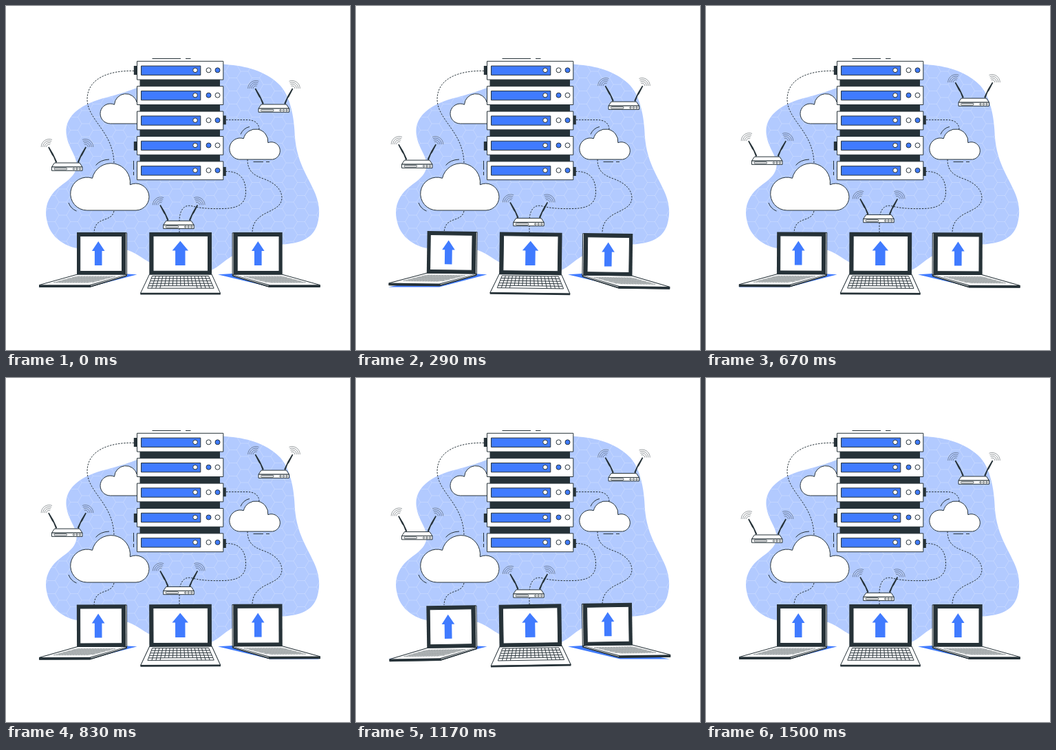
Animation of 500 by 500 pixels, one loop 1540 ms. Source, as an HTML page:

```html
<!DOCTYPE html>
<html lang="en">
<head>
<meta charset="utf-8">
<title>Cloud upload</title>
<style>
  html, body { margin: 0; width: 100%; height: 100%; overflow: hidden; background: #fff; }
  svg { display: block; width: 100vw; height: 100vh; }
  .ink { fill: none; stroke: #263238; stroke-width: 1; stroke-linejoin: round; }
  .box { fill: #fff; stroke: #263238; stroke-width: 1; stroke-linejoin: round; }
  .blue { fill: #407bff; }
  .dark { fill: #263238; }
  .wire { stroke-dasharray: 2.4 1.7; }
  .wave { stroke-width: .6; opacity: .8; }
  .thin { stroke-width: .8; }
  .key { stroke-width: .95; }
  .hatch { stroke-width: .5; opacity: .6; }
  .shine { fill: none; stroke: #fff; stroke-width: .8; }
</style>
</head>
<body>
<svg viewBox="0 0 500 500">
  <defs>
    <pattern id="hex" width="33" height="19" patternUnits="userSpaceOnUse">
      <path d="M0 9.5H5.5L11 0H22L27.5 9.5H33M5.5 9.5L11 19H22L27.5 9.5" fill="none" stroke="#fff" stroke-width=".6" opacity=".36"/>
    </pattern>
    <path id="blob" d="M87.500 184C86 158 112 141 146 133C180 124 196 117 225 104C256 90 290 81 325 85.500C354 88 381 97 399 116C413 132 419 160 420 191C423 226 437 245 447 267C455 284 458 300 452 319C445 339 426 345 402 346.500C368 348 350 354 328 364C314 372 306 384 286 388C256 392 228 384 206 371C192 363 184 355 168 353C146 350 125 356 104 352.500C83 348 67 336 61 318C55 299 58 284 70 270C82 257 98 252 102 236C106 219 89 207 87.500 184Z"/>
  </defs>

  <use href="#blob" fill="#b2caff"/>
  <use href="#blob" fill="url(#hex)"/>

  <g class="ink wire">
    <path d="M186 94.300C150 93.500 118 105 118 136C119 167 156 182 157 229"/>
    <path d="M320 165.500H350C361 165.500 368 170 368 180"/>
    <path d="M351 223C351 240 360 246 374 251C391 257 401 267 401 279C400 303 358 295 358 330"/>
    <path d="M157 298C153 316 129 304 128 330"/>
    <path d="M319 240.500C339 240 348 250 348.500 269C349 288 337 294 316 294.500C296 295 282 294 269 290.500C256 288 252 302 252 312V329"/>
  </g>

  <path class="box" d="M200 171H151.500A14.500 14.500 0 1 1 157.500 143.300A16.700 16.700 0 0 1 190.300 140Q194 140 200 145Z"/>
  <path class="box" d="M117.800 297A24 24 0 1 1 125.500 250.300A27.850 27.850 0 0 1 180.300 259.800A19.500 19.500 0 1 1 189 297Z"/>
  <path class="box" d="M338.500 223A15.600 15.600 0 1 1 345.300 192.700A18.050 18.050 0 0 1 380.800 198.700A12.700 12.700 0 1 1 387.500 223Z"/>

  <path class="ink" d="M130.500 231.500Q137 223.500 150 223M91 286Q94 294.500 102.500 298M341 186.500Q345 177.500 354 175.500M359.500 226.500H374M378 226.500H383M185.500 225V238M185.500 241V246M212.500 76.500H254M261 76.500H268.500"/>

  <g id="server"></g>
  <path class="blue" d="M47 408.500H121L190.500 390.300L150 388ZM308 390.300L345 388L456 408.500H384Z"/>
  <g id="laptops"></g>
  <g id="routers"></g>
</svg>
<script>
const byId = id => document.getElementById(id);
const rect = (x, y, w, h, cls, fill = '') =>
  `<rect x="${x}" y="${y}" width="${w}" height="${h}" class="${cls}" style="fill:${fill}"/>`;
const path = (d, cls) => `<path d="${d}" class="${cls}"/>`;
const dot = (x, y, r, cls, fill = '#fff') =>
  `<circle cx="${x}" cy="${y}" r="${r}" class="${cls}" style="fill:${fill}"/>`;
const BLUE = '#407bff';

function server() {
  let s = rect(194.5, 100, 116.5, 132, 'dark');
  for (const [x, y] of [[185.8, 87], [185.8, 197], [315, 159.3], [315, 234]]) s += rect(x, y, 4.8, 13, 'dark');
  for (let i = 0; i < 5; i++) {
    const y = 80.3 + i * 36.4;
    const lit = i % 2 ? 294.5 : 307.5;
    s += rect(190.5, y, 125.3, 26.8, 'box') + rect(196.5, y + 6.8, 86.3, 13.3, 'box', BLUE);
    s += dot(275, y + 13, 3.3, 'box');
    for (const x of [294.5, 307.5]) s += dot(x, y + 13, 3.5, 'box', x === lit ? BLUE : '#fff');
  }
  return s;
}

// Upward arrow: tip, half widths of head and shaft
const arrow = (x, y, head, shaft) => path(
  `M${x} ${y}L${x + head} ${y + 14}H${x + shaft}V377H${x - shaft}V${y + 14}H${x - head}Z`, 'blue');

function sideLaptop() {
  let s = path('M104 390H175.500L175 392.500L122 408.500H48.500V405.500Z', 'box');
  s += path('M48 405.300H121.500L175.500 390V392.500L122 408.800H48Z', 'dark');
  s += path('M123 406.500L174 391.300', 'shine');
  // keyboard rows and slanted columns
  let d = '';
  for (let i = 0; i < 6; i++) d += `M${103 - i * 6.8} ${393 + i * 1.8}h${56 - i * .8}`;
  for (let i = 0; i < 15; i++) d += `M${103 + i * 4} 393l-34 9`;
  s += path(d, 'ink hatch');
  s += rect(173, 329.8, 2.6, 60.5, 'box');
  s += rect(103, 329, 71.3, 61.5, 'dark');
  return s + rect(107.7, 334.5, 60.8, 51, 'box');
}

function midLaptop() {
  let s = path('M208.500 390H299L311.500 417.500H195.500Z', 'box');
  s += rect(195.3, 416.8, 116.5, 2.7, 'dark');
  // keys narrow towards the screen
  const left = y => 212.5 - (y - 392.5) * .38;
  const right = y => 294.5 + (y - 392.5) * .43;
  const at = (u, y) => left(y) + (right(y) - left(y)) * u;
  let d = '';
  for (let r = 0; r < 5; r++) {
    const y = 392.5 + r * 3.55, y2 = y + 3.55;
    d += `M${left(y)} ${y}H${right(y)}`;
    for (let c = 0; c <= 16; c++) {
      if (r === 4 && c > 3 && c < 12) continue;
      const u = c / 16;
      d += `M${at(u, y)} ${y}L${at(u, y2)} ${y2}`;
    }
  }
  d += `M${left(410.25)} 410.25H${right(410.25)}`;
  s += path(d, 'ink key');
  s += rect(208.3, 329, 90.7, 61.5, 'dark');
  return s + rect(214, 334.3, 79.5, 51, 'box');
}

function antenna() {
  let s = path('M61.100 205.400L62.600 204.600L68.800 215L74.200 226.500L72.500 228.500L69 219.500L66.800 216.500Z', 'dark');
  const a = 292 * Math.PI / 180;
  for (const r of [4, 6.5, 9, 11.5]) {
    const x = 62.7 + r * Math.cos(a), y = 205 + r * Math.sin(a);
    s += path(`M${62.7 - r} 205A${r} ${r} 0 0 1 ${x} ${y}`, 'ink wave');
  }
  return s;
}

function router(dx, dy) {
  let s = antenna() + `<g transform="translate(178 0) scale(-1 1)">${antenna()}</g>`;
  s += path('M70.500 228H107L111 234H66.500Z', 'box') + rect(66.5, 234, 44.5, 5.3, 'box');
  s += `<rect x="70" y="235.4" width="18.5" height="2.5" rx="1" class="box thin"/>`;
  for (const x of [98.5, 103, 107.5]) s += dot(x, 236.7, 1.2, 'box thin');
  return `<g transform="translate(${dx} ${dy})">${s}</g>`;
}

byId('server').innerHTML = server();
byId('laptops').innerHTML = sideLaptop() +
  `<g transform="translate(504.7 0) scale(-1 1)">${sideLaptop()}</g>` + midLaptop() +
  arrow(134.2, 342, 9.3, 5.3) + arrow(366.3, 342, 9.3, 5.3) + arrow(253.3, 341.5, 11.7, 7.2);
byId('routers').innerHTML = router(0, 0) + router(300.5, -85) + router(162.2, 84.3);

const LOOP = 1540, CYCLE = 36;
const triangle = p => 1 - Math.abs(1 - 2 * (p % 1));

// The motion advances in 24 steps a second and rests on the last one.
function draw(ms) {
  const step = Math.min(CYCLE, Math.floor((ms % LOOP) * .024 + .12));
  const p = step / CYCLE;
  const tilt = 2 * triangle(p + .25) - 1;
  byId('laptops').setAttribute('transform', `rotate(${tilt} 252.4 374.3)`);
  byId('routers').setAttribute('transform', `translate(0 ${-10 * triangle(p)})`);
}

let start;
function tick(now) {
  start ??= now;
  draw(now - start);
  requestAnimationFrame(tick);
}
draw(0);
requestAnimationFrame(tick);
</script>
</body>
</html>
```
